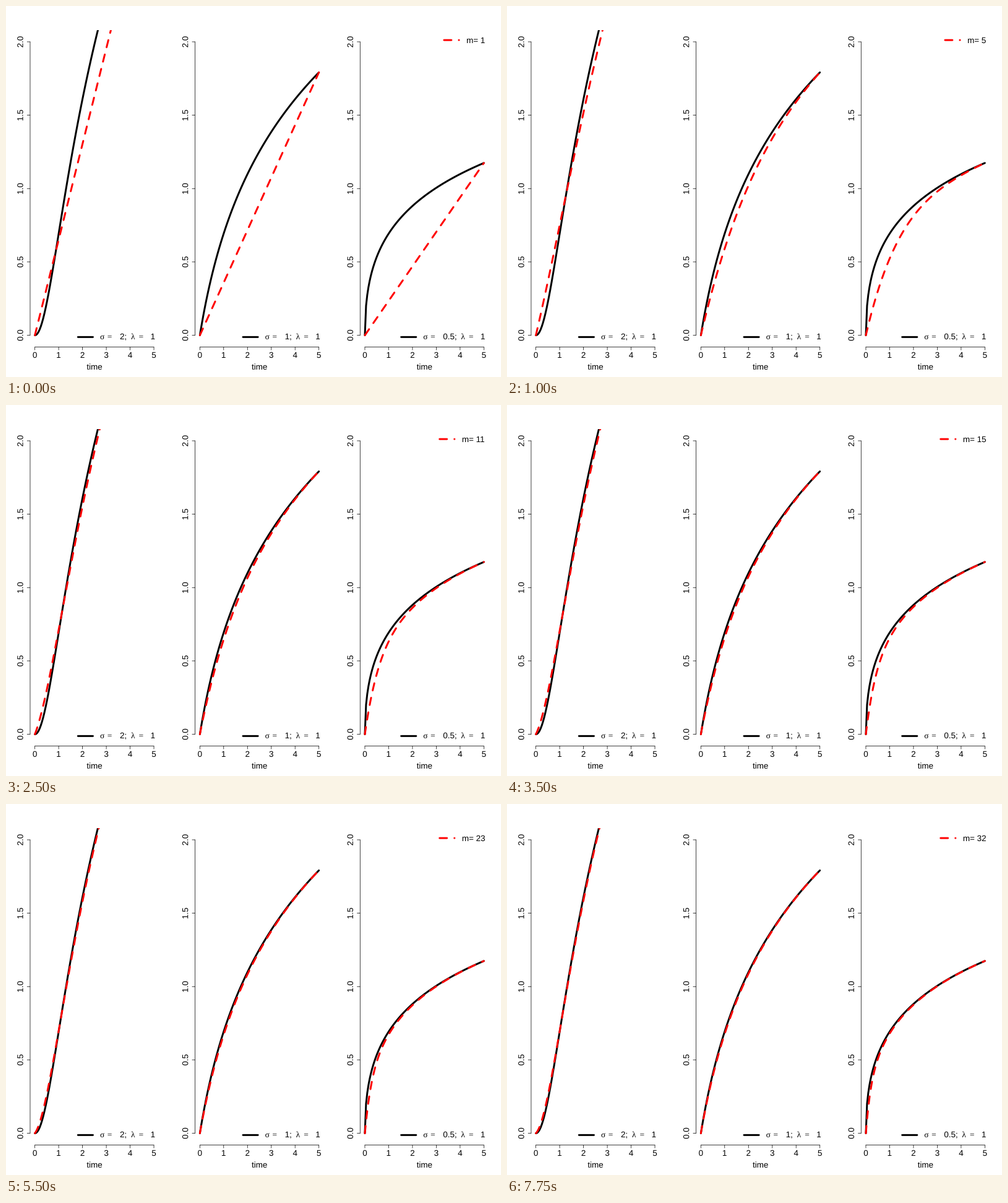
Recreate the animation shown at these times as a matplotlib script. Size 800 px wide and 600 px high, loop 8 s.

```python
from math import comb

import numpy as np
import matplotlib.pyplot as plt
from matplotlib.animation import FuncAnimation
from matplotlib.patches import PathPatch
from matplotlib.textpath import TextPath
from matplotlib.transforms import Affine2D, Bbox

W, H, DPI = 800, 600, 100
FRAMES, INTERVAL = 32, 250
PX = 72 / DPI                        # points per pixel
T_MAX = 5
SIGMAS = (2, 1, 0.5)
STEP = W / 3                         # distance between panels

# Margins in text lines, then data ranges widened by 4 % on each side.
LINE = 9.504
LEFT, TOP = 4.1 * LINE, 4.1 * LINE
RIGHT, BOTTOM = STEP - 2.1 * LINE, H - 5.1 * LINE
X_UNIT = (RIGHT - LEFT) / 5.4
Y_UNIT = (BOTTOM - TOP) / 2.16
X0, Y0 = LEFT + 0.2 * X_UNIT, BOTTOM - 0.08 * Y_UNIT

TICK = LINE / 2
FONT_SIZE = 13.4
SEG = 24.2                           # length of a legend line
KEY_GAP = 16.16                      # legend line to plot edge
SANS, SERIF = "Liberation Sans", "Liberation Serif"

plt.rcParams["path.simplify"] = False

fig = plt.figure(figsize=(W / DPI, H / DPI), dpi=DPI, facecolor="white")
ax = fig.add_axes([0, 0, 1, 1])
ax.set_xlim(0, W)
ax.set_ylim(H, 0)
ax.axis("off")

t = np.linspace(0, T_MAX, 101)


def curve(x, sigma):
    return np.log(1 + x ** sigma)


def bernstein(sigma, m):
    """Bernstein approximation of degree m on [0, T_MAX]."""
    u = t / T_MAX
    return sum(curve(T_MAX * k / m, sigma) * comb(m, k) * u**k * (1 - u)**(m - k)
               for k in range(m + 1))


def to_y(value):
    return Y0 - Y_UNIT * value


def text_path(x, y, text, font=SANS, center=False, upright=False):
    """Outline of a text whose baseline starts, or is centred, at (x, y)."""
    path = TextPath((0, 0), text, size=FONT_SIZE, prop={"family": [font]})
    place = Affine2D()
    if center:
        box = path.get_extents()
        place.translate(-(box.x0 + box.x1) / 2, 0)
    place.scale(1, -1)
    if upright:
        place.rotate_deg(-90)
    return place.translate(x, y).transform_path(path)


def write(*args, **kwargs):
    return ax.add_patch(PathPatch(text_path(*args, **kwargs),
                                  facecolor="black", lw=0, snap=False))


def thin(xs, ys):
    ax.plot(xs, ys, color="black", lw=0.75 * PX, solid_capstyle="round",
            snap=False)


def thick(xs, ys, dashed=False):
    style = dict(color="red", ls=(0, (4, 4))) if dashed else dict(color="black")
    line, = ax.plot(xs, ys, lw=3 * PX, solid_capstyle="round",
                    dash_capstyle="round", solid_joinstyle="round",
                    dash_joinstyle="round", snap=False, **style)
    return line


def draw_axes(dx):
    thin([X0 + dx, X0 + dx + T_MAX * X_UNIT], [BOTTOM, BOTTOM])
    for k in range(T_MAX + 1):
        x = X0 + dx + k * X_UNIT
        thin([x, x], [BOTTOM, BOTTOM + TICK])
        write(x, round(BOTTOM + 1.8 * LINE), str(k), center=True)
    left = LEFT + dx
    thin([left, left], [to_y(0), to_y(2)])
    for v in np.arange(0, 2.1, 0.5):
        y = to_y(v)
        thin([left - TICK, left], [y, y])
        write(left - 1.2 * LINE, y, f"{v:.1f}", center=True, upright=True)
    write((LEFT + RIGHT) / 2 + dx, round(BOTTOM + 3.8 * LINE), "time", center=True)


def draw_key(dx, sigma):
    label = f"{sigma};"
    shift = dx - (11 if len(label) > 2 else 0)   # longer labels grow leftwards
    mid = BOTTOM - KEY_GAP
    y = round(mid + 3.8)
    thick([116.3 + shift, 116.3 + SEG + shift], [mid, mid])
    write(152 + shift, y, "σ", SERIF)
    write(163.8 + shift, y, "=", SERIF)
    write(184 + shift, y, label)
    write(202 + dx, y, "λ", SERIF)
    write(214.6 + dx, y, "=", SERIF)
    write(233.6 + dx, y, "1")


approx = []
for i, sigma in enumerate(SIGMAS):
    dx = i * STEP
    draw_axes(dx)
    draw_key(dx, sigma)
    xs = X0 + dx + X_UNIT * t
    box = Bbox.from_extents(LEFT + dx, H - BOTTOM, RIGHT + dx, H - TOP)
    solid = thick(xs, to_y(curve(t, sigma)))
    dashes = thick(xs, to_y(t), dashed=True)
    for line in (solid, dashes):
        line.set_clip_box(box)
    approx.append(dashes)

m_y = TOP + KEY_GAP
m_line = thick([708, 708 + SEG], [m_y, m_y], dashed=True)
m_text = write(744, 60, "m= 1")


def update(frame):
    m = frame + 1
    for line, sigma in zip(approx, SIGMAS):
        line.set_ydata(to_y(bernstein(sigma, m)))
    shift = -7.2 if m > 9 else 0
    m_line.set_xdata([707.9 + shift, 707.9 + SEG + shift])
    m_text.set_path(text_path(744.1 + shift, round(m_y + 4.7), f"m= {m}"))
    return [*approx, m_line, m_text]


anim = FuncAnimation(fig, update, frames=FRAMES, interval=INTERVAL, repeat=True)
plt.show()
```
